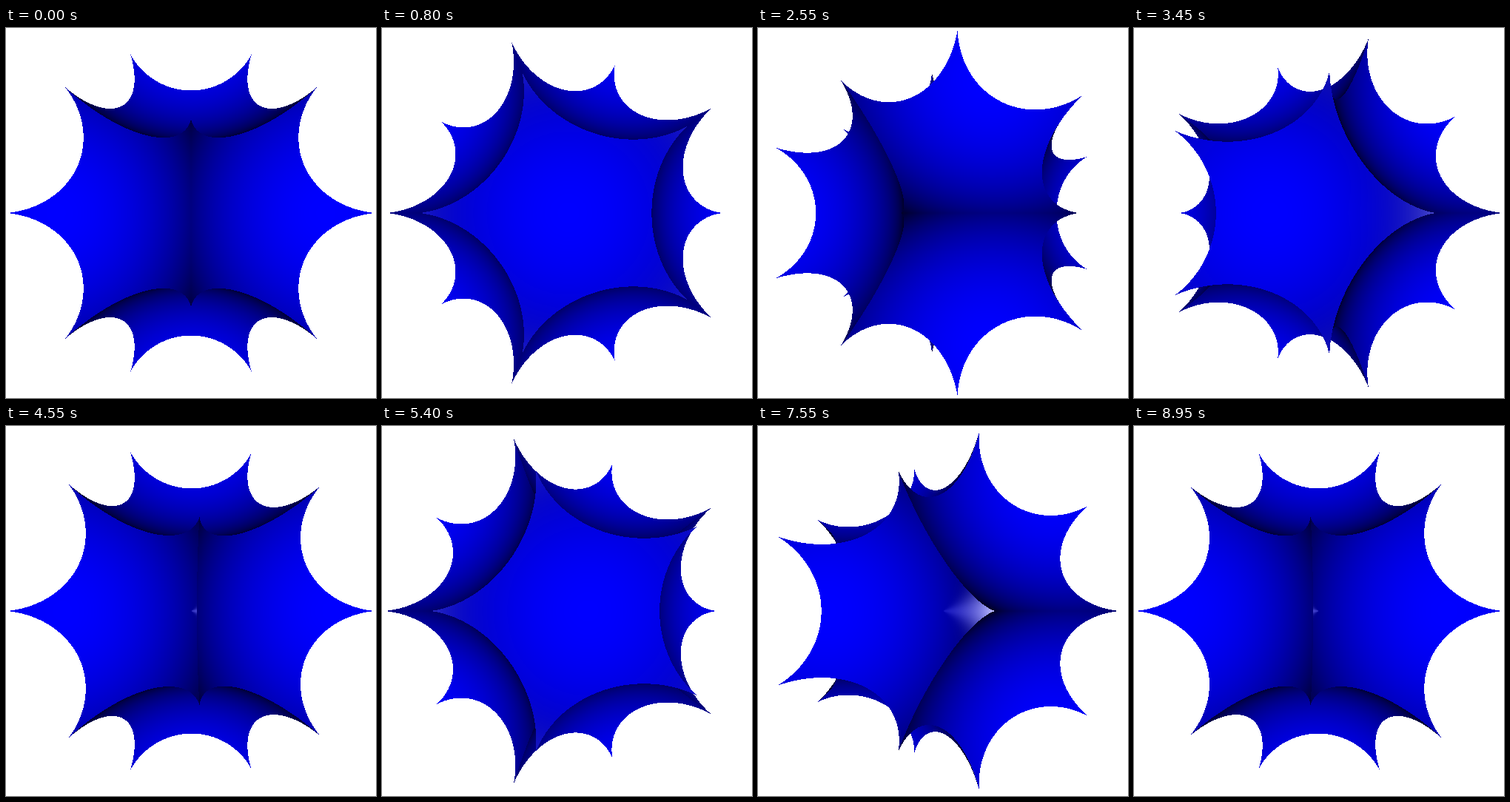
An HTML page with a canvas that plays this animation: 500 px wide and 500 px high, repeating every 9 s.

```html
<!DOCTYPE html>
<html lang="en">
<head>
<meta charset="utf-8">
<title>Hyperbolic dodecahedron</title>
<style>
html, body { margin: 0; width: 100%; height: 100%; overflow: hidden; background: #fff; }
canvas { display: block; width: 100vw; height: 100vh; }
</style>
</head>
<body>
<canvas id="stage" width="500" height="500"></canvas>
<script>
const SIZE = 500, HALF = SIZE / 2;
const STEP = 50, STEPS = 180;
const EYE = 2.5;                              // camera distance
const FOCAL = HALF / Math.tan(Math.PI / 8);   // 45 degree field of view
const DIST = 1.26, R2 = DIST * DIST - 1, RADIUS = Math.sqrt(R2);
const GLOSS = 8;

const ctx = document.getElementById('stage').getContext('2d');
const image = ctx.createImageData(SIZE, SIZE);
const pixels = new Uint32Array(image.data.buffer);

// Centres of the twelve balls that carve the faces out of the unit ball
const PHI = (1 + Math.sqrt(5)) / 2;
const scale = DIST / Math.hypot(1, PHI);
const centres = [];
for (const s of [-scale, scale])
  for (const t of [-scale * PHI, scale * PHI])
    centres.push([s, 0, t], [0, t, s], [t, s, 0]);

const COUNT = centres.length;
const cx = new Float64Array(COUNT), cy = new Float64Array(COUNT), cz = new Float64Array(COUNT);
const power = new Float64Array(COUNT);
const enter = new Float64Array(COUNT), leave = new Float64Array(COUNT);

function turn(angle) {
  const c = Math.cos(angle), s = Math.sin(angle);
  centres.forEach(([x, y, z], i) => {
    cx[i] = x * c + z * s;
    cy[i] = y;
    cz[i] = z * c - x * s;
    power[i] = cx[i] ** 2 + y * y + (EYE - cz[i]) ** 2 - R2;
  });
}

function shade(face, x, y, z) {
  const nx = (cx[face] - x) / RADIUS, ny = (cy[face] - y) / RADIUS, nz = (cz[face] - z) / RADIUS;
  const toAxis = -(nx * x + ny * y) / (Math.hypot(x, y) || 1);
  const gloss = toAxis > 0 ? 255 * Math.pow(toAxis, GLOSS) : 0;
  const grey = Math.min(255, Math.round(gloss));
  const blue = Math.min(255, Math.round(255 * Math.max(0, nz) + gloss));
  return (255 << 24 | blue << 16 | grey << 8 | grey) >>> 0;
}

function trace(px, py) {
  const len = Math.hypot(px, py, FOCAL);
  const dx = px / len, dy = py / len, dz = -FOCAL / len;
  const mid = -EYE * dz, disc = mid * mid - EYE * EYE + 1;
  if (disc <= 0) return 0xffffffff;
  const root = Math.sqrt(disc), end = mid + root;
  let t = mid - root, n = 0;
  const hit = [];
  for (let i = 0; i < COUNT; i++) {
    const b = dx * cx[i] + dy * cy[i] + dz * (cz[i] - EYE);
    const q = b * b - power[i];
    if (q <= 0) continue;
    const h = Math.sqrt(q);
    enter[n] = b - h;
    leave[n] = b + h;
    hit[n++] = i;
  }
  // Skip from ball to ball until the ray is in solid matter
  let face = -1, moved = true;
  while (moved && t < end) {
    moved = false;
    for (let k = 0; k < n; k++) {
      if (enter[k] <= t + 1e-9 && t < leave[k]) {
        t = leave[k];
        face = hit[k];
        moved = true;
      }
    }
  }
  if (t >= end || face < 0) return 0xffffffff;
  return shade(face, dx * t, dy * t, EYE + dz * t);
}

function draw(step) {
  turn(step / STEPS * 2 * Math.PI);
  for (let row = 0; row < HALF; row++) {
    const top = row * SIZE, bottom = (SIZE - 1 - row) * SIZE;
    for (let col = 0; col < SIZE; col++) {
      pixels[top + col] = pixels[bottom + col] = trace(col + 0.5 - HALF, HALF - row - 0.5);
    }
  }
  ctx.putImageData(image, 0, 0);
}

const start = performance.now();
let shown = -1;
function tick() {
  const step = Math.floor((performance.now() - start) / STEP) % STEPS;
  if (step !== shown) draw(shown = step);
  requestAnimationFrame(tick);
}
tick();
</script>
</body>
</html>
```
